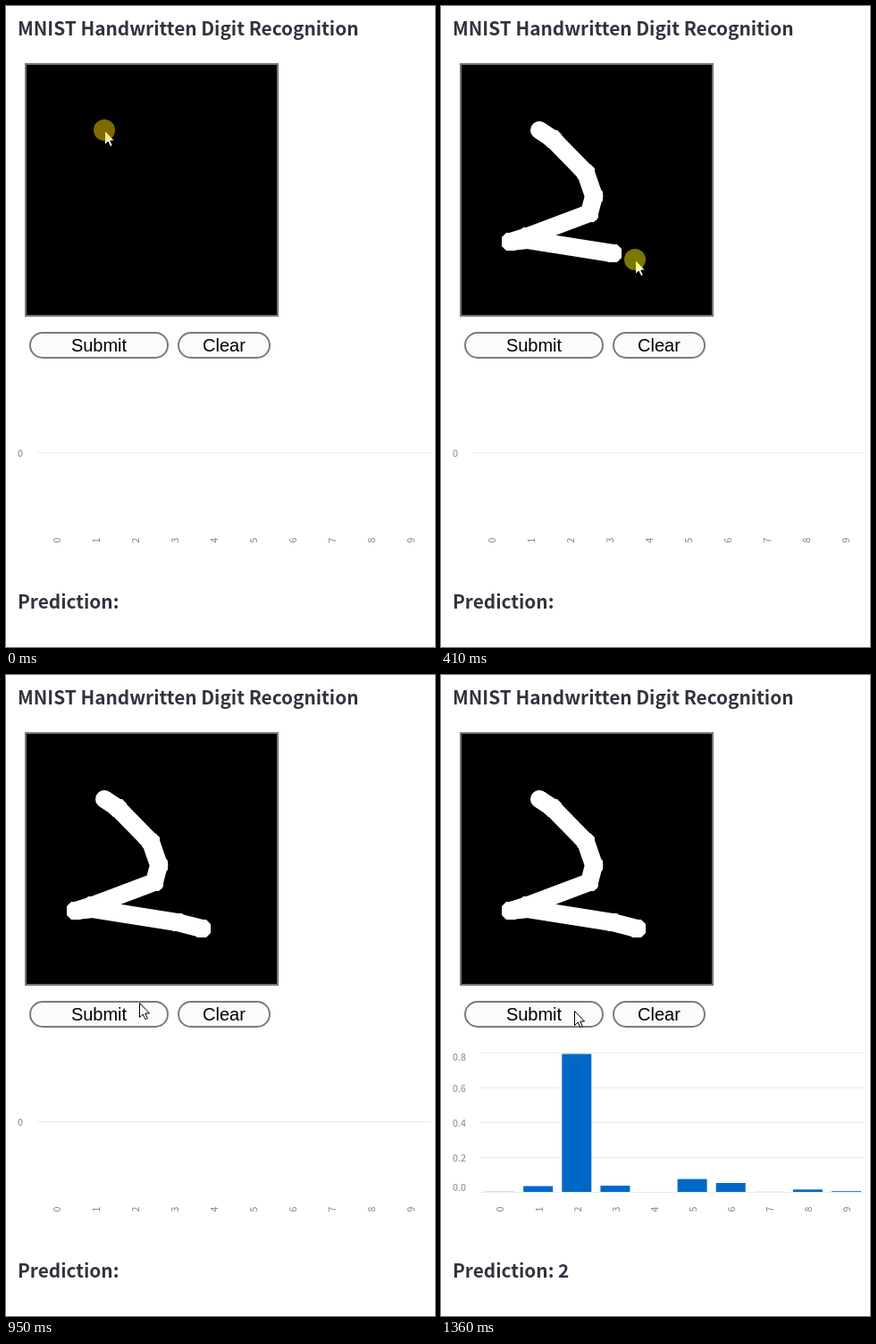
Write an HTML page that moves like this. It is 480 px wide and 718 px high and loops after 3940 ms.

```html
<!DOCTYPE html>
<html lang="en">
<head>
<meta charset="utf-8">
<title>Digit Recognition</title>
<style>
  html, body { margin: 0; width: 100%; height: 100%; overflow: hidden; background: #fff; }
  svg { display: block; }
  text { font-family: "Noto Sans CJK JP", "Noto Sans CJK SC", "Noto Sans CJK", "Noto Sans", sans-serif; }
  .head { font-size: 20.8px; font-weight: 600; fill: #31333f; }
  .tick { font-size: 10.75px; fill: #808495; }
  .btn rect { fill: #fbfbfb; stroke: #7b7b7b; stroke-width: 2; }
  .btn text { font: 20px "Liberation Sans", Arial, sans-serif; text-anchor: middle; fill: #000; }
  .grid { stroke: #e6eaf1; stroke-width: 1; }
  .bar { fill: #0068c9; }
</style>
</head>
<body>
<svg id="stage" width="480" height="718" viewBox="0 0 480 718">
  <defs>
    <marker id="dot" markerUnits="userSpaceOnUse" markerWidth="20" markerHeight="20" refX="10" refY="10">
      <circle cx="10" cy="10" r="10" fill="#fff"/>
    </marker>
    <marker id="nib" markerUnits="userSpaceOnUse" markerWidth="20" markerHeight="20" refX="10" refY="10">
      <path d="M5 0H15L20 5V15L15 20H5L0 15V5Z" fill="#fff"/>
    </marker>
  </defs>
  <rect x="22" y="65" width="282" height="282" fill="#000" stroke="#767676" stroke-width="2"/>
  <polyline id="ink" fill="none" stroke="#fff" stroke-width="20"
    marker-start="url(#dot)" marker-mid="url(#nib)" marker-end="url(#nib)"/>
  <g id="page">
    <text class="head" x="13" y="33">MNIST Handwritten Digit Recognition</text>
    <g class="btn">
      <rect x="27" y="366" width="154" height="28" rx="14"/>
      <text x="104" y="387">Submit</text>
      <rect x="193" y="366" width="102" height="28" rx="14"/>
      <text x="244" y="387">Clear</text>
    </g>
    <g id="emptyChart"></g>
    <g id="fullChart"></g>
    <text id="result" class="head" x="13" y="675"></text>
  </g>
  <path id="arrow" d="M.5 .5V16.5L4.2 13L6.8 18.6L9.3 17.5L6.8 12H11.5Z" fill="#fff" stroke="#000"/>
  <circle id="halo" r="12"/>
</svg>
<script>
const LOOP = 3940, FADE_AT = 1300, RESULT_AT = 1360;
const $ = id => document.getElementById(id);

// Pen path; the ink trails the pointer by one point
const pen = [[110, 139], [125, 149], [162, 187], [171, 213], [166, 232],
  [97, 258], [78, 264], [97, 262], [192, 277], [219, 284]];

const HOVER = "rgba(255,212,0,.5)", PRESS = "rgba(255,250,0,.48)", NONE = "none";

// time, pointer x, pointer y, halo colour, inked points
const steps = [
  [0, 110, 139, HOVER, 0],
  [120, 162, 187, PRESS, 2],
  [200, 166, 231, PRESS, 4],
  [270, 78, 264, PRESS, 6],
  [340, 192, 277, PRESS, 8],
  [410, 217, 284, PRESS, 9],
  [480, 219, 284, PRESS, 10],
  [540, 223, 287, NONE, 10],
  [610, 214, 290, NONE, 10],
  [680, 198, 302, NONE, 10],
  [750, 181, 322, NONE, 10],
  [820, 166, 341, NONE, 10],
  [880, 155, 356, NONE, 10],
  [950, 149, 367, NONE, 10],
  [1020, 149, 374, NONE, 10],
  [1090, 149, 376, PRESS, 10],
  [1160, 149, 376, NONE, 10]
];

function add(parent, tag, attrs, label) {
  const el = document.createElementNS("http://www.w3.org/2000/svg", tag);
  for (const key in attrs) el.setAttribute(key, attrs[key]);
  if (label !== undefined) el.textContent = label;
  parent.appendChild(el);
}

function gridLine(parent, x, y) {
  add(parent, "line", { class: "grid", x1: x, x2: 475, y1: y, y2: y });
}

function yLabel(parent, y, label) {
  add(parent, "text", { class: "tick", x: 13, y }, label);
}

function xLabels(parent, start, gap) {
  for (let i = 0; i < 10; i++) {
    add(parent, "text", {
      class: "tick", "text-anchor": "middle",
      transform: `translate(${start + gap * i + 4} 598.5) rotate(-90)`
    }, i);
  }
}

function buildCharts() {
  const empty = $("emptyChart"), full = $("fullChart");
  gridLine(empty, 36, 500.5);
  yLabel(empty, 505, "0");
  xLabels(empty, 57, 44);

  [432, 467, 506, 545, 578].forEach((y, i) => {
    gridLine(full, 44, [423.5, 462.5, 501.5, 540.5, 579.5][i]);
    yLabel(full, y, (0.8 - 0.2 * i).toFixed(1));
  });
  xLabels(full, 66.4, 43.1);
  const heights = [0.2, 6.5, 154.5, 7, 0, 14.4, 10, 0.1, 2.7, 0.8];
  heights.forEach((height, i) => add(full, "rect", {
    class: "bar", x: 49.1 + 43.1 * i, y: 579 - height, width: 33, height
  }));
}

function draw(t) {
  const [, x, y, color, inked] = steps.filter(s => s[0] <= t).pop();
  const done = t >= RESULT_AT;
  $("ink").setAttribute("points", pen.slice(0, inked).join(" "));
  $("arrow").setAttribute("transform", `translate(${x} ${y})`);
  $("halo").setAttribute("transform", `translate(${x} ${y})`);
  $("halo").setAttribute("fill", color);
  $("page").setAttribute("opacity", t >= FADE_AT && !done ? 0.93 : 1);
  $("emptyChart").setAttribute("display", done ? "none" : "inline");
  $("fullChart").setAttribute("display", done ? "inline" : "none");
  $("result").textContent = done ? "Prediction: 2" : "Prediction:";
}

buildCharts();
const start = performance.now();
function tick() {
  draw((performance.now() - start) % LOOP);
  requestAnimationFrame(tick);
}
tick();
</script>
</body>
</html>
```
